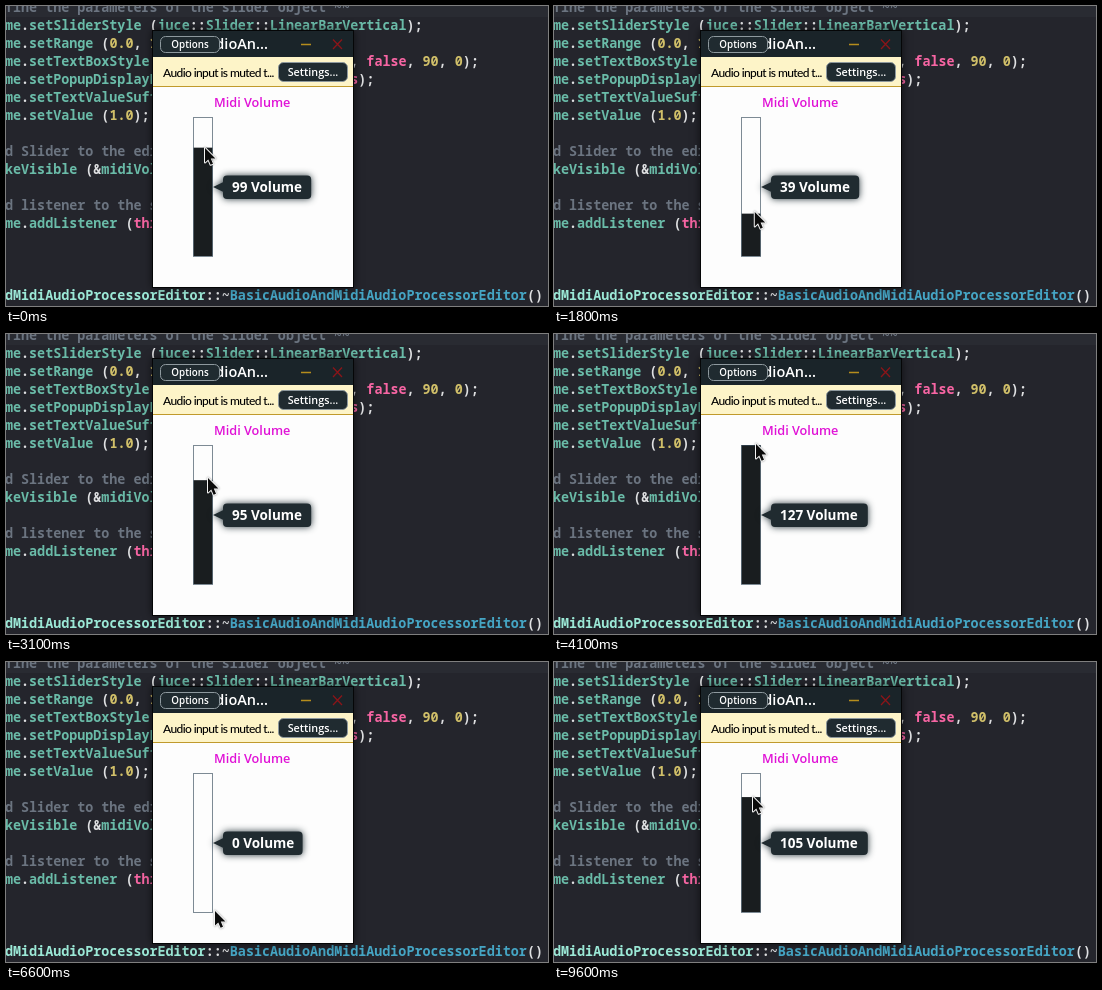
Recreate the animation shown at these times as an HTML page with a canvas. Size 542 by 300 pixels, loop 9700 ms.

```html
<!DOCTYPE html>
<html lang="en">
<head>
<meta charset="utf-8">
<title>Midi volume slider</title>
<style>
  html, body { margin: 0; width: 100%; height: 100%; overflow: hidden; background: #24252c; }
  canvas { display: block; }
</style>
</head>
<body>
<canvas id="stage" width="542" height="300"></canvas>
<script>
const ctx = document.getElementById('stage').getContext('2d');
const LOOP = 9700, STEP = 100;
const ROW = 18, COLUMN = 8.03;
const SANS = '"Open Sans", sans-serif', MONO = '13.38px "Noto Sans Mono", monospace';
const DARK = '#202b30', PINK = '#f765a3';

// Row number and text.
const code = [
  [0, '// fine the parameters of the slider object ~~'],
  [1, 'me.setSliderStyle (juce::Slider::LinearBarVertical);'],
  [2, 'me.setRange (0.0, 127.0, 1.0);'],
  [3, 'me.setTextBoxStyle (juce::Slider::NoTextBox, false, 90, 0);'],
  [4, 'me.setPopupDisplayEnabled (true, false, this);'],
  [5, 'me.setTextValueSuffix (" Volume");'],
  [6, 'me.setValue (1.0);'],
  [8, '// d Slider to the editor'],
  [9, 'keVisible (&midiVolume);'],
  [11, '// d listener to the slider'],
  [12, 'me.addListener (this);'],
  [16, 'dMidiAudioProcessorEditor::~BasicAudioAndMidiAudioProcessorEditor()']
];

// Time, slider value, pointer x, pointer y.
const keys = [
  [0, 99, 199, 142], [900, 15, 199, 233], [2500, 68, 202, 173], [4100, 127, 202, 110],
  [6600, 0, 209, 249], [8000, 110, 201, 127], [9600, 105, 199, 135]
];
const keyAt = i => {
  const n = keys.length, turn = Math.floor(i / n), key = keys[i - turn * n];
  return [key[0] + turn * LOOP, ...key.slice(1)];
};
const slope = (i, c) => {
  const a = keyAt(i), b = keyAt(i + 1);
  return (b[c] - a[c]) / (b[0] - a[0]);
};
// Harmonic mean of the neighbouring slopes: no overshoot, flat at turning points.
const tangent = (i, c) => {
  const p = slope(i - 1, c), q = slope(i, c);
  return p * q > 0 ? 2 * p * q / (p + q) : 0;
};
function valueAt(t, c) {
  let i = 0;
  while (keyAt(i + 1)[0] <= t) i++;
  const a = keyAt(i), b = keyAt(i + 1), d = b[0] - a[0], u = (t - a[0]) / d;
  return a[c] + (b[c] - a[c]) * u * u * (3 - 2 * u)
    + d * u * (1 - u) * (tangent(i, c) * (1 - u) - tangent(i + 1, c) * u);
}

function text(str, x, y, font, color, align = 'left') {
  ctx.font = font;
  ctx.fillStyle = color;
  ctx.textAlign = align;
  ctx.fillText(str, x, y);
}
function rect(x, y, w, h, color) {
  ctx.fillStyle = color;
  ctx.fillRect(x, y, w, h);
}
function line(color, width, ...points) {
  ctx.strokeStyle = color;
  ctx.lineWidth = width;
  ctx.beginPath();
  for (const [x1, y1, x2, y2] of points) { ctx.moveTo(x1, y1); ctx.lineTo(x2, y2); }
  ctx.stroke();
}
function withShadow(color, blur, draw) {
  ctx.save();
  ctx.shadowColor = color;
  ctx.shadowBlur = blur;
  draw();
  ctx.restore();
}

function tokenColor(token, row) {
  if (/^(true|false|this)$/.test(token)) return PINK;
  if (/^\d/.test(token)) return '#d0bf69';
  if (!/^\w/.test(token)) return '#dfe0e2';
  if (row === 16) return token.startsWith('Basic') ? '#45a5c4' : '#9be8d6';
  return '#6abba8';
}
function drawCode() {
  rect(0, 0, 542, 300, '#24252c');
  rect(0, 0, 542, 11, '#292b32');
  for (const [row, str] of code) {
    const y = 5.5 + row * ROW;
    if (str.startsWith('//')) {
      text(str.slice(3), -1, y, `600 ${MONO}`, '#6b7480');
      continue;
    }
    for (const m of str.matchAll(/\d+\.?\d*|\w+|[^\w\s]+/g)) {
      const color = tokenColor(m[0], row), weight = color === PINK ? 800 : 600;
      text(m[0], m.index * COLUMN - 1, y, `${weight} ${MONO}`, color);
    }
  }
}

function button(label, x, y, w, h, size) {
  ctx.beginPath();
  ctx.roundRect(x + .5, y + .5, w - 1, h - 1, 5);
  ctx.fillStyle = DARK;
  ctx.fill();
  ctx.strokeStyle = '#8e999e';
  ctx.lineWidth = 1;
  ctx.stroke();
  text(label, x + w / 2, y + h / 2 + 3.5, `600 ${size}px ${SANS}`, '#fff', 'center');
}
function drawWindow() {
  withShadow('rgba(0,0,0,.6)', 8, () => rect(146, 24, 202, 258, '#050607'));
  rect(147, 25, 200, 26, '#1a2429');
  rect(147, 51, 200, 30, '#fdf4c8');
  rect(147, 80, 200, 1, '#c09a2c');
  rect(147, 81, 200, 200, '#fdfdfd');
  text('BasicAudioAn...', 262, 43, `600 14.5px ${SANS}`, '#fff', 'right');
  button('Options', 154, 30, 60, 17, 9.8);
  line('#b58d1c', 1.5, [295, 38.5, 305, 38.5]);
  line('#8a1519', 1.3, [327, 33.5, 336, 43], [336, 33.5, 327, 43]);
  ctx.letterSpacing = '-0.6px';
  text('Audio input is muted t...', 157, 71, '500 12px Lato, sans-serif', '#000');
  ctx.letterSpacing = '0px';
  button('Settings...', 272, 56, 70, 20, 10.8);
  text('Midi Volume', 208, 101, `600 12.7px ${SANS}`, '#e012d6');
}

function drawSlider(value) {
  const height = value / 127 * 139;
  rect(187.5, 250 - height, 19, height, '#191d1f');
  ctx.strokeStyle = 'rgba(58,78,92,.65)';
  ctx.lineWidth = 1;
  ctx.strokeRect(187.5, 111.5, 19, 139);

  const label = Math.round(value) + ' Volume';
  const width = 71 + 8.6 * String(Math.round(value)).length;
  ctx.beginPath();
  ctx.roundRect(217, 169.5, width, 23.5, 4);
  ctx.moveTo(207, 181);
  ctx.lineTo(217.5, 176);
  ctx.lineTo(217.5, 186);
  ctx.closePath();
  ctx.fillStyle = DARK;
  withShadow('rgba(20,35,42,.9)', 7, () => ctx.fill());
  text(label, 226, 186, `700 13.5px ${SANS}`, '#fff');
}

const arrow = new Path2D('M0 0V14.5L3.3 11.4L5.6 16.8L8 15.8L5.8 10.5H10.4Z');
function drawPointer(x, y) {
  ctx.save();
  ctx.translate(x, y);
  ctx.lineJoin = 'round';
  ctx.lineWidth = 2;
  ctx.strokeStyle = '#f4f4f4';
  withShadow('rgba(0,0,0,.4)', 2, () => ctx.stroke(arrow));
  ctx.fillStyle = '#0b0b0b';
  ctx.fill(arrow);
  ctx.restore();
}

function frame() {
  const t = Math.floor(performance.now() % LOOP / STEP) * STEP;
  drawCode();
  drawWindow();
  drawSlider(valueAt(t, 1));
  drawPointer(valueAt(t, 2), valueAt(t, 3));
  requestAnimationFrame(frame);
}
frame();
</script>
</body>
</html>
```
